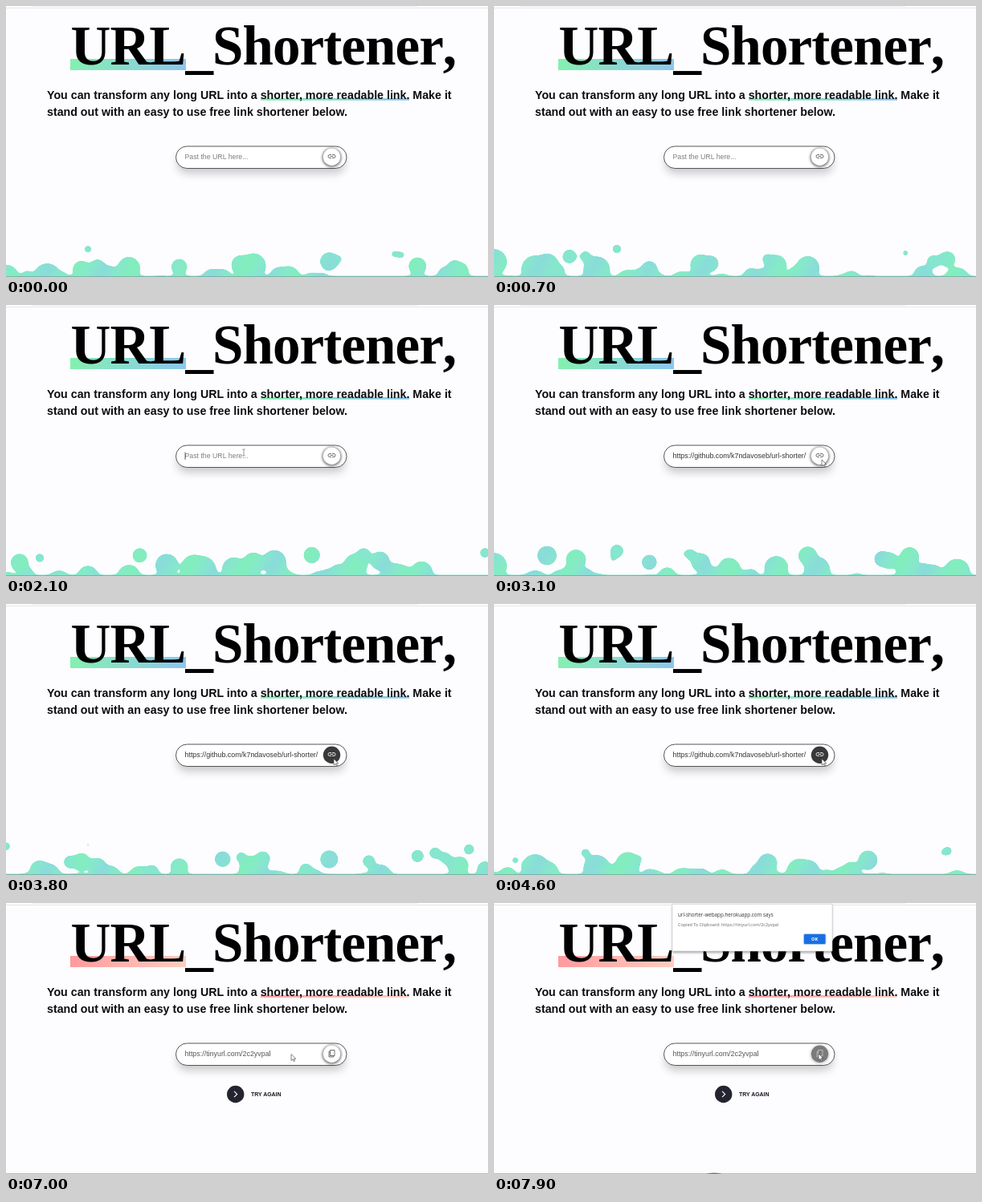
These frames come from a looping animation (600x338 px, 8000 ms). An HTML page:

```html
<!DOCTYPE html>
<html lang="en">
<head>
<meta charset="utf-8">
<title>URL Shortener</title>
<style>
  html, body { margin: 0; width: 100%; height: 100%; overflow: hidden; background: #fdfcfe; }
  svg { display: block; width: 600px; height: 338px; }
  text { font-family: "Liberation Sans", Arial, sans-serif; white-space: pre; }
  .title { font: bold 69px "Liberation Serif", "Times New Roman", serif; letter-spacing: -.92px; font-kerning: none; }
  .lead { font-size: 14.22px; font-weight: bold; fill: #0c0c10; }
  .again { font-size: 6.95px; font-weight: bold; fill: #16171f; }
  .alert text { font-family: "Open Sans", "Noto Sans", sans-serif; }
</style>
</head>
<body>
<svg viewBox="0 0 600 338">
  <defs>
    <linearGradient id="cool"><stop stop-color="#84f0b0"/><stop offset="1" stop-color="#8cc6ee"/></linearGradient>
    <linearGradient id="warm"><stop stop-color="#ff9a9e"/><stop offset="1" stop-color="#fecdc0"/></linearGradient>
    <linearGradient id="slime" gradientUnits="userSpaceOnUse" x2="26" y2="15" spreadMethod="reflect">
      <stop stop-color="#82eebb"/><stop offset=".5" stop-color="#86e8cb"/><stop offset="1" stop-color="#8adadb"/>
    </linearGradient>
    <filter id="goo" filterUnits="userSpaceOnUse" x="-30" y="230" width="660" height="180" color-interpolation-filters="sRGB">
      <feGaussianBlur stdDeviation="3.5"/>
      <feColorMatrix values="1 0 0 0 0  0 1 0 0 0  0 0 1 0 0  0 0 0 19 -8"/>
    </filter>
    <filter id="soft" x="-50%" y="-50%" width="200%" height="200%"><feGaussianBlur stdDeviation="1.8"/></filter>
    <filter id="wide" x="-20%" y="-90%" width="140%" height="280%"><feGaussianBlur stdDeviation="5.5"/></filter>
  </defs>

  <path d="M0 2.5H600" stroke="#e6e5e8"/>
  <path d="M33 .5H512" stroke="#efeef1"/>

  <g id="marks"><rect x="80" y="66" width="144" height="14"/><rect x="317" y="115" width="185" height="2.8"/></g>
  <text class="title" x="80.5" y="73">URL<tspan dy="3">_</tspan><tspan dy="-3">Shortener,</tspan></text>
  <text class="lead" x="51" y="116">You can transform any long URL into a shorter, more readable link. Make it</text>
  <text class="lead" x="51" y="137">stand out with an easy to use free link shortener below.</text>

  <rect x="213" y="183" width="209" height="26" rx="12" opacity=".2" filter="url(#wide)"/>
  <rect x="211.5" y="175" width="212.5" height="27.5" rx="13.75" fill="#fff" stroke="#444448" stroke-width=".9"/>
  <text id="field" x="222.5" y="191.3"/>
  <path id="caret" d="M223 183.5v9.5" stroke="#333" stroke-width=".7"/>
  <circle id="glow" cx="405.5" cy="189" r="12" filter="url(#soft)"/>
  <circle id="button" cx="405.5" cy="188.3" r="10.7"/>
  <path id="icon" fill="none" stroke-width="1.7" transform="translate(399.5 181.5) scale(.5)"/>

  <g id="again">
    <circle cx="285.7" cy="238.5" r="10.7" fill="#23242f"/>
    <path d="M284 234.8l3.7 3.7-3.7 3.7" fill="none" stroke="#fff" stroke-width="1.1"/>
    <text class="again" x="305" y="241.2">TRY AGAIN</text>
  </g>

  <g filter="url(#goo)"><g id="pool"><rect x="-30" y="337" width="660" height="60" fill="#86e6ce"/></g></g>
  <path d="M0 337.7H600" stroke="#77777c" stroke-width=".6"/>

  <g id="alert" class="alert">
    <ellipse cx="274" cy="339" rx="10" ry="2.5" fill="#77777a"/>
    <rect x="222" y="3" width="199" height="59" opacity=".35" filter="url(#soft)"/>
    <rect x="222" y="1.5" width="199" height="58.5" fill="#fff" stroke="#cfcfd3" stroke-width=".6"/>
    <text x="229" y="17" font-size="6.25" fill="#333">url-shorter-webapp.herokuapp.com says</text>
    <text x="229" y="29" font-size="5.45" fill="#666">Copied To Clipboard: https://tinyurl.com/2c2yvpal</text>
    <rect x="385" y="38" width="28.5" height="14" rx="2" fill="#a9c9f7"/>
    <rect x="386" y="39" width="26.5" height="12" rx="1.5" fill="#1a6fe0"/>
    <text x="399.2" y="47.2" font-size="5.6" font-weight="bold" fill="#fff" text-anchor="middle">OK</text>
  </g>

  <path id="arrow" d="M0 0v8l1.9-1.8 1.3 2.8 1.3-.6-1.3-2.7h2.6z" fill="#fff" stroke="#333" stroke-width=".6"/>
  <path id="beam" d="M-1.5-4h3M0-4v8M-1.5 4h3" stroke="#555" stroke-width=".6"/>
</svg>
<script>
const $ = id => document.getElementById(id);
const clamp = (v, a = 0, b = 1) => Math.min(b, Math.max(a, v));
const ease = k => k * k * (3 - 2 * k);
const show = (id, on) => $(id).style.display = on ? "" : "none";
const grey = v => `rgb(${v},${v},${v})`;

const LOOP = 8000, ENTER = 1900, FOCUS = 2000, PASTE = 2600, HOVER = 3100;
const RESULT = 5200, COPY = 7500, ALERT = 7700;
const LINK_ICON = "M11 8H7a4 4 0 0 0 0 8h4M13 8h4a4 4 0 0 1 0 8h-4M8 12h8";
const COPY_ICON = "M8 4h11v14H8zM8 8H5v13h11v-3";
const COUNT = 48, START = 356, SINK = 38;

let seed = 29;
const rand = () => (seed = seed * 16807 % 2147483647) / 2147483647;
const between = (a, b) => a + rand() * (b - a);

const bubbles = Array.from({ length: COUNT }, (_, i) => {
  const node = document.createElementNS("http://www.w3.org/2000/svg", "circle");
  node.setAttribute("cx", (i + rand()) * 600 / COUNT);
  $("pool").appendChild(node);
  return { node, size: between(7, 18), rise: between(46, 64), life: between(2000, 4000), phase: rand() };
});

// Each bubble speeds up as it rises and shrinks away over its last quarter
function drawPool(t) {
  $("pool").setAttribute("transform", `translate(0 ${t >= RESULT ? SINK : 0})`);
  for (const { node, size, rise, life, phase } of bubbles) {
    const p = (t / life + phase) % 1;
    const r = size * clamp((1 - p) * 4);
    node.setAttribute("cy", START - rise * p ** 1.6);
    node.setAttribute("r", r);
    node.setAttribute("fill", r < 9 ? "#86e6ce" : "url(#slime)");
  }
}

// Pointer stops: the field, the button, the short link, the button again
const stops = [
  { from: ENTER, to: 2600, x: 296, y: 184 },
  { from: 3000, to: 5300, x: 408, y: 193 },
  { from: 6000, to: 6600, x: 320, y: 189 },
  { from: COPY, to: LOOP, x: 404, y: 188 }
];

function drawPointer(t) {
  const i = stops.findIndex(s => t <= s.to);
  const b = stops[i], a = stops[i - 1] || b;
  const k = ease(clamp((t - a.to) / (b.from - a.to)));
  const typing = i === 0;
  const at = typing ? b : { x: a.x + (b.x - a.x) * k, y: a.y + (b.y - a.y) * k };
  show("arrow", !typing);
  show("beam", typing && t >= ENTER);
  $(typing ? "beam" : "arrow").setAttribute("transform", `translate(${at.x} ${at.y})`);
}

function drawPage(t) {
  const done = t >= RESULT, pasted = t >= PASTE;
  $("marks").setAttribute("fill", `url(#${done ? "warm" : "cool"})`);
  $("field").textContent = done ? "https://tinyurl.com/2c2yvpal"
    : pasted ? "https://github.com/k7ndavoseb/url-shorter/" : "Past the URL here...";
  $("field").style.cssText = `font-size:${pasted ? 8.9 : 8.75}px;fill:${done ? "#555" : pasted ? "#333" : "#7d7d80"}`;
  show("caret", t >= FOCUS && !pasted && t % 1000 < 500);
  show("again", done);
  show("alert", t >= ALERT);

  // The alert freezes the second fade part of the way
  const hover = clamp((Math.min(t, ALERT) - (done ? COPY : HOVER)) / 300);
  $("glow").setAttribute("opacity", 0.5 * (1 - hover));
  $("button").setAttribute("fill", grey(255 - 198 * hover));
  $("icon").setAttribute("stroke", grey(85 + 170 * hover));
  $("icon").setAttribute("d", done ? COPY_ICON : LINK_ICON);
}

const start = performance.now();
function frame() {
  const t = Math.floor((performance.now() - start) % LOOP / 100) * 100;
  drawPage(t);
  drawPool(t);
  drawPointer(t);
  requestAnimationFrame(frame);
}
frame();
</script>
</body>
</html>
```
